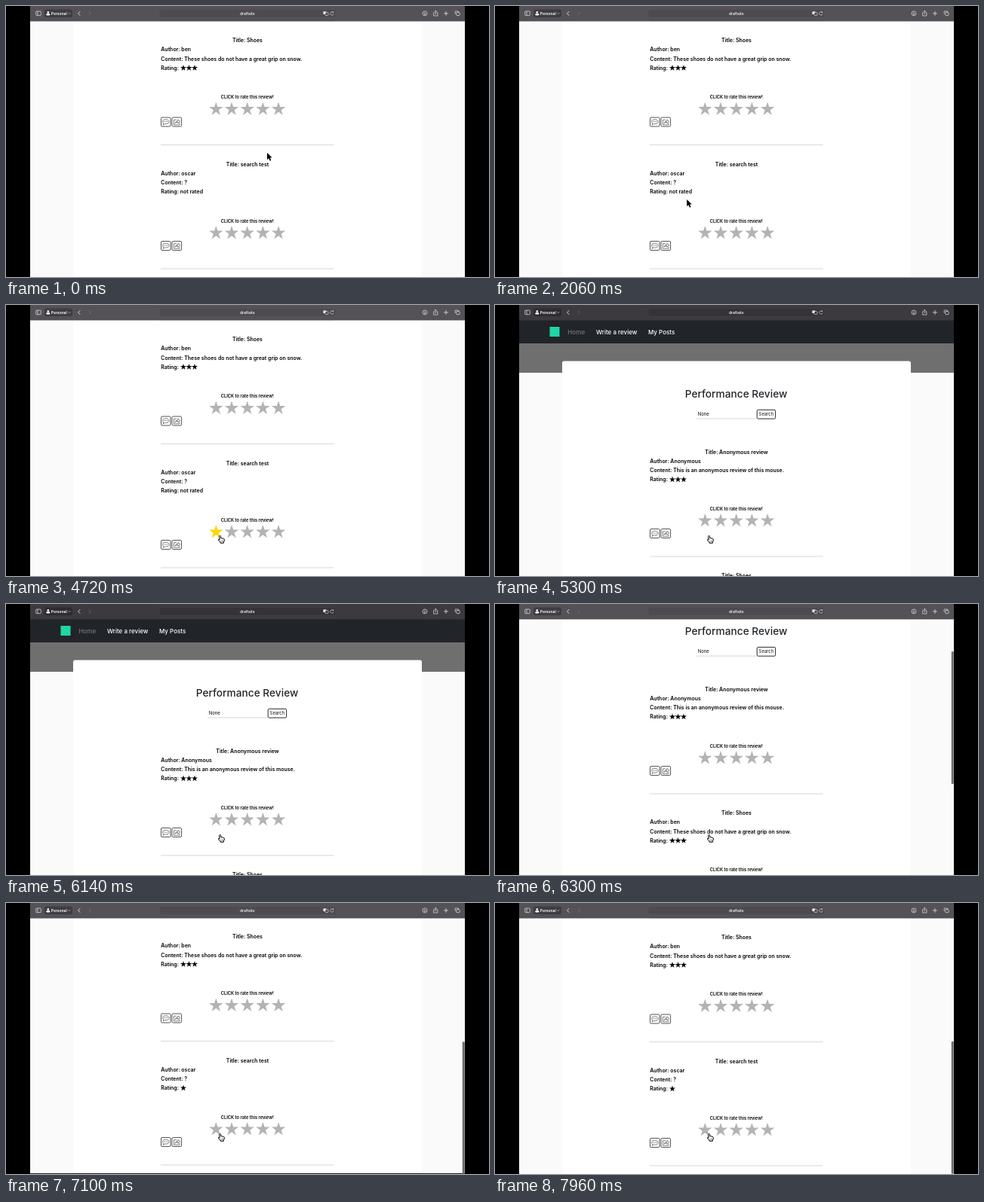
Recreate the animation shown at these times as an HTML page with a canvas. Size 640x360 px, loop 8 s.

```html
<!DOCTYPE html>
<html lang="en">
<head>
<meta charset="utf-8">
<title>Review page</title>
<style>
  html, body { margin: 0; width: 100%; height: 100%; overflow: hidden; background: #000; }
  canvas { display: block; width: 640px; height: 360px; }
</style>
</head>
<body>
<canvas id="stage" width="640" height="360"></canvas>
<script>
const ctx = document.getElementById('stage').getContext('2d');
const LOOP = 8000, RELOAD = 5000, MAX_SCROLL = 314;

const reviews = [
  { title: 'Anonymous review', author: 'Anonymous', content: 'This is an anonymous review of this mouse.', stars: 3 },
  { title: 'Shoes', author: 'ben', content: 'These shoes do not have a great grip on snow.', stars: 3 },
  { title: 'search test', author: 'oscar', content: '?', stars: 0 }
];

// Each move: start time, end time, then the values reached
const cursorMoves = [
  [140, 240, 345, 195], [380, 1120, 261.5, 254], [1220, 1540, 254, 256],
  [1780, 1800, 253.5, 255.5], [1960, 2060, 254.2, 257], [2220, 2240, 253.8, 256],
  [2480, 2720, 251, 264], [2720, 3220, 275, 306], [3320, 3480, 283.6, 306.6],
  [7680, 7800, 282, 306.6], [7940, 7960, 283.6, 306.6]
];
const scrollMoves = [
  [RELOAD, RELOAD, 0], [6180, 6540, MAX_SCROLL + 2], [6680, 7100, MAX_SCROLL + 1],
  [7100, 7240, MAX_SCROLL + 0.5], [7380, 7380, MAX_SCROLL]
];

const arrow = new Path2D('M0 0V9.2L2.1 7.2L3.7 10.7L5.3 10L3.8 6.6H6.6Z');
const hand = new Path2D('M-.9 .8Q-.8 0 0 0Q.8 0 .9 .9L1.3 3.4Q2.2 2.8 2.9 3.6Q3.8 3.2 4.3 4Q5.5 3.8 5.7 4.9' +
  'Q5.9 7 4.8 8.2V9.5H.6V8.7Q-.9 7.6-2.1 5.7Q-2.3 4.7-1.3 4.9L-.4 5.5Z');
const handLines = new Path2D('M1.3 6.2V8M2.7 6.2V8M4 6.2V8');

const ease = p => p * p * (3 - 2 * p);
const clamp = p => Math.max(0, Math.min(1, p));

function track(start, moves, t) {
  let now = start;
  for (const [from, to, ...goal] of moves) {
    if (t < from) break;
    const p = to > from ? ease(clamp((t - from) / (to - from))) : 1;
    now = now.map((v, i) => v + (goal[i] - v) * p);
  }
  return now;
}

function rect(x, y, w, h, fill) {
  ctx.fillStyle = fill;
  ctx.fillRect(x, y, w, h);
}

function box(x, y, w, h, r, fill, stroke, line = 1) {
  ctx.beginPath();
  ctx.roundRect(x, y, w, h, r);
  if (fill) { ctx.fillStyle = fill; ctx.fill(); }
  if (stroke) { ctx.strokeStyle = stroke; ctx.lineWidth = line; ctx.stroke(); }
}

// y is the middle of the capitals; drawn large and scaled for exact spacing
function text(str, x, y, size, color = '#000', align = 'left', weight = 500) {
  ctx.save();
  ctx.translate(x, y + size * 0.36);
  ctx.scale(0.1, 0.1);
  ctx.font = `${weight} ${size * 10}px Inter, "Liberation Sans", sans-serif`;
  ctx.textAlign = align;
  ctx.fillStyle = color;
  ctx.fillText(str, 0, 0);
  ctx.restore();
}

const bodyText = (str, x, y, align, size = 6.97) => text(str, x, y, size, '#000', align, 600);

function line(path, color, width = 0.8) {
  ctx.strokeStyle = color;
  ctx.lineWidth = width;
  ctx.stroke(new Path2D(path));
}

function star(x, y, r, color) {
  ctx.beginPath();
  for (let i = 0; i < 10; i++) {
    const a = i * Math.PI / 5, d = i % 2 ? r * 0.382 : r;
    ctx.lineTo(x + d * Math.sin(a), y - d * Math.cos(a));
  }
  ctx.fillStyle = color;
  ctx.fill();
}

function reviewIcons(y) {
  const ink = '#2a2a2a';
  ctx.save();
  ctx.translate(205.5, y - 6);
  for (const x of [0, 14.5]) box(x, 0, 12.6, 12, 1.5, '#fff', ink, 0.8);
  line('M6.3 2.8C9 2.8 10.6 4 10.6 5.7S9 8.6 6.3 8.6L5 8.5L2.8 9.8L3.3 7.9C2.4 7.3 2 6.6 2 5.7C2 4 3.6 2.8 6.3 2.8Z', ink, 0.6);
  for (const x of [3.8, 5.8, 7.8]) rect(x, 5.2, 0.9, 0.9, ink);
  line('M20.5 3.2H17V9.8H24.5V7.6M18.8 7.8Q19 4.8 22.4 4.7V2.8L25.4 5.4L22.4 8V6.2Q20 6.2 18.8 7.8Z', ink, 0.6);
  ctx.restore();
}

function review(r, y, stars, gold) {
  bodyText('Title: ' + r.title, 320, y, 'center');
  bodyText('Author: ' + r.author, 205.3, y + 12.3);
  bodyText('Content: ' + r.content, 205.3, y + 24.5);
  bodyText('Rating: ' + (stars ? '' : 'not rated'), 205.3, y + 36.7);
  for (let i = 0; i < stars; i++) star(235 + i * 7.5, y + 36.8, 4.3, '#000');
  bodyText('CLICK to rate this review!', 319.8, y + 75.5, 'center', 5.75);
  for (let i = 0; i < 5; i++) star(278.3 + i * 20.7, y + 91.6, 9.7, gold && !i ? '#ffd60a' : '#b3b3b3');
  reviewIcons(y + 108.5);
  rect(205, y + 138.5, 229.5, 1, '#d8d8d8');
}

function page(t, scroll) {
  ctx.save();
  ctx.beginPath();
  ctx.rect(32, 20, 576, 340);
  ctx.clip();
  ctx.translate(0, -scroll);
  rect(32, 20, 576, 654, '#fafafa');
  rect(32, 51, 576, 39, '#6f6f6f');
  rect(32, 20, 576, 31, '#212428');
  rect(72.5, 29, 13, 13, '#1fd6a6');
  text('Home', 96.3, 36, 8.1, '#74777a');
  text('Write a review', 134, 36, 8, '#fff');
  text('My Posts', 203, 36, 8, '#fff');
  box(89, 74.5, 462, 620, 2.5, '#fff');
  text('Performance Review', 319.5, 118.3, 13.7, '#212529', 'center');
  text('None', 268.8, 145.2, 5.9, '#000', 'left', 400);
  rect(267, 150.6, 79, 0.8, '#ccc');
  box(347.2, 139.3, 24.4, 11.8, 1.5, '#fff', '#111', 0.9);
  text('Search', 359.4, 145.2, 5.9, '#111', 'center', 400);
  reviews.forEach((r, i) => {
    const last = i === 2;
    review(r, 195 + i * 164.5, last && t >= RELOAD ? 1 : r.stars, last && t >= 3340 && t < RELOAD);
  });
  // Backdrop seen when the page is pulled past its end
  rect(32, 674, 576, 20, '#1a1a1a');
  ctx.restore();
  if (t >= 6180) box(604.8, 20.5 + scroll / 654 * 340, 2.9, 176, 1.2, '#6b6b6b');
}

function toolbar(scroll) {
  const k = clamp(scroll / 40);
  const shade = (dark, light) => {
    const v = Math.round(dark + (light - dark) * k);
    return `rgb(${v},${v - 2},${v + 3})`;
  };
  const ink = '#e4e3e5';
  rect(32, 0, 576, 20.4, shade(60, 84));
  box(51, 4.5, 37, 10.6, 2.5, shade(46, 63));
  box(203, 4.5, 234, 10.8, 2.8, shade(53, 77), shade(73, 90), 0.5);

  box(39.7, 7, 6.6, 5.6, 1, null, ink, 0.7);
  line('M42 7V12.6', ink, 0.7);
  ctx.beginPath();
  ctx.arc(55.8, 8.4, 1.3, 0, 7);
  ctx.fillStyle = '#fff';
  ctx.fill();
  box(53.4, 10, 4.8, 2.6, 1.3, '#fff');
  text('Personal', 59.8, 9.9, 4.95, '#fff', 'left', 600);
  line('M82.7 9.2L84 10.6L85.3 9.2', ink, 0.6);
  line('M98.2 7.2L95.6 9.9L98.2 12.6', ink, 0.9);
  line('M109.7 7.2L112.3 9.9L109.7 12.6', shade(103, 118), 0.9);
  text('draftsite', 319.8, 10, 5, '#fff', 'center');

  box(420.3, 7.2, 4.2, 3.8, 0.8, ink);
  box(423, 8.7, 4, 3.8, 0.8, shade(53, 77), ink, 0.6);
  line('M433.6 8.5A2.2 2.2 0 1 0 434.1 10.4M432.2 8.5H433.8V6.9', ink, 0.6);

  ctx.beginPath();
  ctx.arc(555, 9.9, 3, 0, 7);
  ctx.strokeStyle = ink;
  ctx.lineWidth = 0.7;
  ctx.stroke();
  line('M555 8.2V11.5M553.7 10.3L555 11.6L556.3 10.3', ink, 0.7);
  line('M568 8.7H566.7V13H571.9V8.7H570.6M569.3 11V6.2M567.9 7.5L569.3 6.1L570.7 7.5', ink, 0.7);
  line('M583 7V12.8M580.1 9.9H585.9', ink, 0.8);
  line('M595.2 10.8V7H599.5V8.6', ink, 0.7);
  box(596.8, 8.6, 4.3, 4, 0.6, null, ink, 0.7);
}

function cursor(t) {
  const [x, y] = track([346, 195], cursorMoves, t);
  ctx.save();
  ctx.translate(x, y);
  ctx.lineJoin = 'round';
  const pointing = t >= 3320;
  const shape = pointing ? hand : arrow;
  ctx.strokeStyle = pointing ? '#111' : '#fff';
  ctx.lineWidth = pointing ? 0.9 : 1.2;
  ctx.fillStyle = pointing ? '#fff' : '#000';
  ctx.stroke(shape);
  ctx.fill(shape);
  if (pointing) {
    ctx.stroke(shape);
    ctx.lineWidth = 0.5;
    ctx.stroke(handLines);
  }
  ctx.restore();
}

function draw(t) {
  const [scroll] = track([MAX_SCROLL], scrollMoves, t);
  rect(0, 0, 640, 360, '#000');
  page(t, scroll);
  toolbar(scroll);
  cursor(t);
}

let begin;
function frame(now) {
  begin ??= now;
  draw((now - begin) % LOOP);
  requestAnimationFrame(frame);
}
draw(0);
requestAnimationFrame(frame);
</script>
</body>
</html>
```
